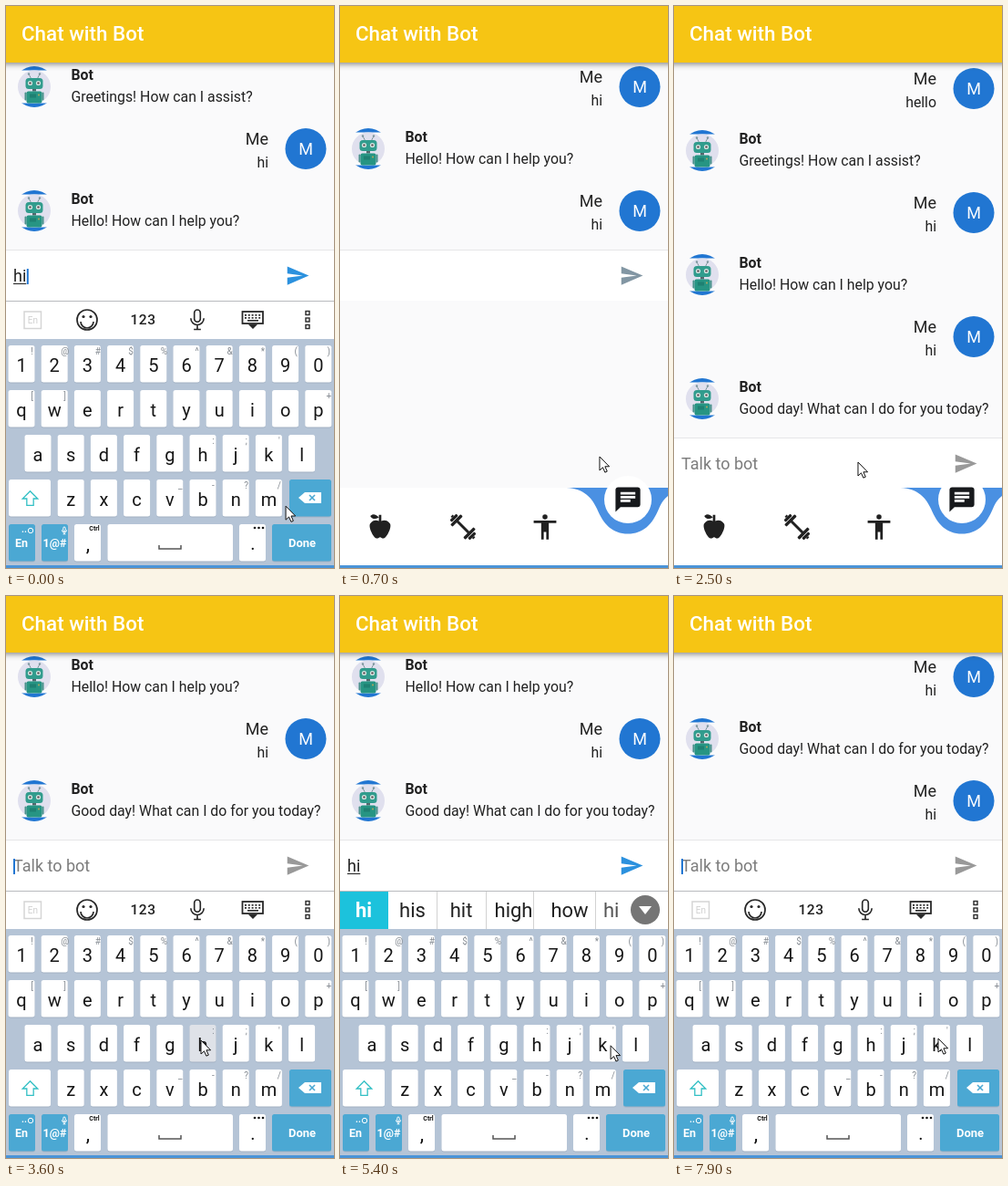
An HTML page with a canvas for the animation above (8 s loop, 360 by 616 pixels).

```html
<!DOCTYPE html>
<html lang="en">
<head>
<meta charset="utf-8">
<title>Chat with Bot</title>
<style>
html, body { margin: 0; width: 100%; height: 100%; overflow: hidden; background: #fafafa; }
canvas { display: block; width: 360px; height: 616px; }
</style>
</head>
<body>
<canvas id="stage"></canvas>
<script>
const W = 360, H = 616, LOOP = 8000;
const canvas = document.getElementById('stage');
const ctx = canvas.getContext('2d');
const ratio = window.devicePixelRatio || 1;
canvas.width = W * ratio;
canvas.height = H * ratio;

const BLUE = '#2176d2', KEY_BLUE = '#4ba8d3', INK = '#212121', BODY_SIZE = 15.83;

// Milestones of the conversation, in ms
const SEND_1 = 400, REPLY = 1400, TYPE_H = 3700, TYPE_I = 4600, SEND_2 = 6900;
const CLOSE = [400, 600], OPEN = [3200, 3400], BAR_DOWN = 800, BAR_UP = 3400;
const CARET_RESETS = [0, 3400, TYPE_H, TYPE_I, 4900, SEND_2];

const MESSAGES = [
  { me: true, text: 'hello', at: 0 },
  { text: 'Greetings! How can I assist?', at: 0 },
  { me: true, text: 'hi', at: 0 },
  { text: 'Hello! How can I help you?', at: 0 },
  { me: true, text: 'hi', at: SEND_1 },
  { text: 'Good day! What can I do for you today?', at: REPLY },
  { me: true, text: 'hi', at: SEND_2 },
];

// time, x, y of the pointer tip
const POINTER = [
  [0, 307, 548], [200, 322, 585], [400, 322, 585], [700, 285, 494], [1000, 272, 488],
  [1400, 272, 488], [2200, 215, 499], [2500, 202, 500], [3000, 190, 502], [3200, 190, 502],
  [3500, 214, 487], [4050, 214, 487], [4400, 271, 442], [4700, 271, 442], [5400, 297, 493],
  [5700, 318, 440], [6000, 316, 324], [6400, 312, 316], [6900, 312, 316], [7600, 288, 480],
  [7900, 290, 485], [8000, 290, 485],
];

const ICONS = {
  send: 'M2 21L23 12 2 3V10l15 2-15 2z',
  chat: 'M20 2H4c-1.1 0-2 .9-2 2v18l4-4h14c1.1 0 2-.9 2-2V4c0-1.1-.9-2-2-2zM6 9h12v2H6zm8 5H6v-2h8zm4-6H6V6h12z',
  person: 'M12 2a2 2 0 0 1 0 4a2 2 0 0 1 0-4zm9 7h-6v13h-2v-6h-2v6H9V9H3V7h18z',
  apple: 'M20 10c2 3-3 12-5 12s-2-1-3-1-1 1-3 1-7-9-5-12 5-3 7-2V5C5.4 8 4.1 3.8 4.1 3.8S6.8.2 11 5V3h2v5c2-1 5-1 7 2z',
  mic: 'M9 5a3 3 0 0 1 6 0v6a3 3 0 0 1-6 0zM5.5 10.5a6.5 6.5 0 0 0 13 0M12 17v4.5M8.5 21.5h7',
  shift: 'M12 3L3 12h5v8h8v-8h5z',
  pointer: 'M0 0V15L3.5 11.8 5.9 17.2 8.3 16.1 5.9 10.8H10.6z',
  bowl: 'M245 528C265 528 275 536 282 551C289 568 299 578.5 316 578.5C333 578.5 343 568 350 551C353 544 356 540 360 537V528z',
};
for (const name in ICONS) ICONS[name] = new Path2D(ICONS[name]);

const clamp = v => Math.max(0, Math.min(1, v));
const progress = (t, [from, to]) => clamp((t - from) / (to - from));

function rect(x, y, w, h, color, radius = 0) {
  ctx.fillStyle = color;
  ctx.beginPath();
  ctx.roundRect(x, y, w, h, radius);
  ctx.fill();
}

function circle(x, y, r, color) {
  ctx.fillStyle = color;
  ctx.beginPath();
  ctx.arc(x, y, r, 0, Math.PI * 2);
  ctx.fill();
}

function line(points, color, width = 1) {
  ctx.strokeStyle = color;
  ctx.lineWidth = width;
  ctx.beginPath();
  points.forEach(([x, y]) => ctx.lineTo(x, y));
  ctx.stroke();
}

function text(str, x, y, size, color = INK, align = 'left', weight = 400) {
  ctx.font = `${weight} ${size}px Roboto, sans-serif`;
  ctx.fillStyle = color;
  ctx.textAlign = align;
  ctx.fillText(str, x, y);
}

// Draws a 24-unit icon centred on x, y
function icon(name, x, y, scale, color, outlineWidth) {
  ctx.save();
  ctx.translate(x - 12 * scale, y - 12 * scale);
  ctx.scale(scale, scale);
  ctx.fillStyle = ctx.strokeStyle = color;
  ctx.lineWidth = outlineWidth;
  if (outlineWidth) ctx.stroke(ICONS[name]);
  else ctx.fill(ICONS[name], 'evenodd');
  ctx.restore();
}

function botAvatar(y) {
  ctx.save();
  ctx.translate(31, y);
  ctx.beginPath();
  ctx.arc(0, 0, 22.5, 0, Math.PI * 2);
  ctx.clip();
  rect(-23, -23, 46, 5, BLUE);
  rect(-23, 18, 46, 5, BLUE);
  circle(0, 0, 18, '#e0e0ee');
  for (const side of [-1, 1]) {
    line([[side * 3.5, -9], [side * 6, -14]], '#7f979e');
    circle(side * 6, -14, 1.2, '#7f979e');
    rect(side * 9.5 - 1, 6, 2, 9, '#4a918b', 1);
  }
  rect(-9.5, -9.5, 19, 12, '#319c8d', 3.5);
  for (const side of [-1, 1]) {
    circle(side * 4.5, -4, 2.6, '#d5e8e4');
    circle(side * 4.5, -4, 1.3, '#6c5b60');
  }
  rect(-2, 2.5, 4, 2.5, '#53676c');
  rect(-8.5, 5, 17, 13, '#279583', 2);
  rect(-5, 8, 7, 4, '#1f8072');
  circle(5, 9, 1, '#b5a55c');
  ctx.restore();
}

function message({ me, text: words }, y) {
  if (me) {
    circle(329, y, 22.5, BLUE);
    text('M', 329, y + 6.3, 18, '#fff', 'center');
    text('Me', 288, y - 5, 18, INK, 'right');
    text(words, 288, y + 20, BODY_SIZE, INK, 'right');
  } else {
    botAvatar(y);
    text('Bot', 71.5, y - 7.5, BODY_SIZE, INK, 'left', 700);
    text(words, 71.5, y + 16, BODY_SIZE);
  }
}

function header() {
  ctx.save();
  ctx.shadowColor = 'rgba(0,0,0,.45)';
  ctx.shadowBlur = 6 * ratio;
  ctx.shadowOffsetY = 2 * ratio;
  rect(-10, -10, W + 20, 72, '#f6c514');
  ctx.restore();
  text('Chat with Bot', 17, 38, 22.4, '#fff', 'left', 500);
}

function inputBar(t, top, draft, focused) {
  rect(0, top, W, 56, '#fff');
  rect(0, top, W, 1, '#e6e6e8');
  const settling = t >= SEND_1 && t < BAR_DOWN;
  if (draft) {
    text(draft, 8, top + 35, 18);
    rect(8, top + 37, ctx.measureText(draft).width, 1, INK);
  } else if (!settling) {
    text('Talk to bot', 8, top + 34.5, 18, '#7c7c7c');
  }
  const reset = CARET_RESETS.filter(r => r <= t).pop();
  if (focused && (t - reset) % 1000 < 500) {
    const x = draft ? 8.5 + ctx.measureText(draft).width : 8;
    rect(x, top + 21, 2, 17, BLUE);
  }
  icon('send', 320, top + 28.5, 1.125, draft ? '#2b91de' : settling ? '#8296a3' : '#999');
}

function navigation() {
  rect(0, 528, W, 88, '#fff');
  ctx.fillStyle = '#4a90e2';
  ctx.fill(ICONS.bowl);
  circle(316, 541, 26, '#fff');
  icon('chat', 316, 541, 1.36, '#17191c');
  icon('apple', 44, 570, 1.35, INK);
  icon('person', 225, 571, 1.38, INK);
  ctx.save();
  ctx.translate(135, 571);
  ctx.rotate(Math.PI / 4);
  rect(-11, -1.5, 22, 3, INK);
  for (const side of [-1, 1]) {
    rect(side * 10 - 1.7, -8, 3.4, 16, INK, 1);
    rect(side * 14 - 1.6, -5, 3.2, 10, INK, 1);
    rect(side * 16.5 - 1, -1.5, 2, 3, INK);
  }
  ctx.restore();
}

function toolbar() {
  ctx.strokeStyle = '#d5d5d5';
  ctx.lineWidth = 1.5;
  ctx.strokeRect(20, 335, 18.5, 18.5);
  text('En', 29.3, 348, 10, '#d0d0d0', 'center');

  ctx.strokeStyle = '#292929';
  ctx.lineWidth = 1.7;
  ctx.beginPath();
  ctx.arc(89, 344, 11, 0, Math.PI * 2);
  ctx.moveTo(96, 346);
  ctx.arc(89, 346, 7, 0, Math.PI);
  ctx.stroke();
  circle(85, 340.5, 1.6, '#292929');
  circle(93, 340.5, 1.6, '#292929');

  ctx.letterSpacing = '0.6px';
  text('123', 150.5, 349, 15.5, INK, 'center', 500);
  ctx.letterSpacing = '0px';
  icon('mic', 210, 344, 1.1, '#292929', 1.5);

  ctx.lineWidth = 1.8;
  ctx.strokeRect(259.5, 335, 22.5, 13);
  for (let i = 0; i < 10; i++) rect(262 + i % 5 * 3.8, 338 + (i > 4) * 3, 2, 1.7, '#292929');
  rect(265, 344, 12, 1.6, '#292929');
  triangle(271, 349, 5, 5, '#292929');

  ctx.lineWidth = 1.4;
  for (let i = 0; i < 3; i++) ctx.strokeRect(329, 334.5 + i * 7.5, 4, 4);
}

function triangle(x, y, half, height, color) {
  ctx.fillStyle = color;
  ctx.beginPath();
  ctx.moveTo(x - half, y);
  ctx.lineTo(x + half, y);
  ctx.lineTo(x, y + height);
  ctx.fill();
}

function suggestions(draft) {
  rect(0, 324, 53, 41, '#1cc2dc');
  text(draft, 26, 352, 22, '#fff', 'center', 700);
  const words = [['his', 79.5], ['hit', 133], ['high', 190.5], ['how', 252]];
  words.forEach(([word, x]) => text(word, x, 352, 22, INK, 'center'));
  ctx.save();
  ctx.beginPath();
  ctx.rect(282, 324, 24, 41);
  ctx.clip();
  text('hi', 289, 352, 22, '#555');
  ctx.restore();
  for (const x of [106, 160, 212, 280]) rect(x, 324, 1, 41, '#d2d2d2');
  circle(335, 344, 16, '#757575');
  triangle(335, 340, 7, 9, '#fff');
}

function key(x, y, width, color = '#fff') {
  rect(x, y + 1, width, 40.5, '#a3b2c4', 2.5);
  rect(x, y, width, 40.5, color, 2.5);
}

function keyRow(letters, hints, firstX, y, pressed) {
  [...letters].forEach((letter, i) => {
    const x = firstX + i * 36.2;
    key(x - 14.5, y, 29, letter === pressed ? '#dfe2e8' : '#fff');
    text(letter, x, y + 28.5, 20, '#161616', 'center');
    text(hints[i] || '', x + 11.5, y + 10, 10, '#858b92', 'center');
  });
}

function keyboard(t, draft) {
  rect(0, 323, W, 293, '#b5c4d6');
  rect(0, 323, W, 42, '#fff');
  rect(0, 323, W, 1, '#b9bbbe');
  if (t >= TYPE_H && t < SEND_2) suggestions(draft);
  else toolbar();

  const pressed = t >= 3550 && t < 3750 ? 'h' : t >= 4500 && t < 4650 ? 'i' : '';
  keyRow('1234567890', '!@#$%^&*()', 17, 372, pressed);
  keyRow('qwertyuiop', '[]       +', 17, 421, pressed);
  keyRow('asdfghjkl', "     :;'", 35, 470, pressed);
  keyRow('zxcvbnm', '   _-?/', 71.2, 519, pressed);

  key(3, 519, 46);
  icon('shift', 26.5, 540, 0.92, '#31bfc4', 1.4);
  key(311, 519, 46, KEY_BLUE);
  ctx.fillStyle = '#fff';
  ctx.beginPath();
  [[321, 539], [328, 533], [346, 533], [346, 545], [328, 545]].forEach(p => ctx.lineTo(...p));
  ctx.fill();
  line([[333, 536], [339, 542]], KEY_BLUE, 1.6);
  line([[339, 536], [333, 542]], KEY_BLUE, 1.6);

  const y = 568;
  key(3, y, 29, KEY_BLUE);
  text('En', 17, 593, 12.5, '#fff', 'center', 700);
  text('..', 20, 577, 10, '#fff', 'center', 700);
  ctx.strokeStyle = '#fff';
  ctx.lineWidth = 1;
  ctx.beginPath();
  ctx.arc(27, 575, 2.7, 0, Math.PI * 2);
  ctx.stroke();
  key(39, y, 29, KEY_BLUE);
  text('1@#', 53.5, 593, 12.5, '#fff', 'center', 700);
  icon('mic', 64, 575, 0.4, '#fff', 2.5);
  key(75, y, 29);
  text(',', 90, 597, 22, '#111', 'center');
  text('Ctrl', 97, 575, 7, '#111', 'center', 700);
  key(111.5, y, 137.5);
  line([[168, 591], [168, 595], [192, 595], [192, 591]], '#555', 1.5);
  key(256, y, 29);
  text('.', 271, 596, 20, '#111', 'center');
  for (let i = 0; i < 3; i++) circle(273 + i * 4.5, 572, 1.3, '#111');
  key(292, y, 65, KEY_BLUE);
  text('Done', 325, 593, 13, '#fff', 'center', 700);
}

function pointer(t) {
  const i = POINTER.findIndex(p => p[0] > t);
  const [t0, x0, y0] = POINTER[i - 1], [t1, x1, y1] = POINTER[i];
  const k = progress(t, [t0, t1]);
  ctx.save();
  ctx.translate(x0 + (x1 - x0) * k, y0 + (y1 - y0) * k);
  ctx.fillStyle = '#fff';
  ctx.fill(ICONS.pointer);
  ctx.strokeStyle = '#111';
  ctx.lineWidth = 1;
  ctx.stroke(ICONS.pointer);
  ctx.restore();
}

function draftAt(t) {
  if (t < SEND_1) return 'hi';
  if (t < TYPE_H || t >= SEND_2) return '';
  return t < TYPE_I ? 'h' : 'hi';
}

function draw(t) {
  ctx.setTransform(ratio, 0, 0, ratio, 0, 0);
  rect(0, 0, W, H, '#fafafb');
  const raised = t < BAR_DOWN || t >= BAR_UP;
  const barTop = raised ? 267 : 473;
  const draft = draftAt(t);

  MESSAGES.filter(m => m.at <= t).reverse()
    .forEach((m, i) => message(m, barTop - 42.5 - i * 68));
  header();
  inputBar(t, barTop, draft, t < SEND_1 || t >= BAR_UP);
  navigation();

  const shown = t < OPEN[0] ? 1 - progress(t, CLOSE) : progress(t, OPEN);
  if (shown) {
    ctx.save();
    ctx.translate(0, 293 * (1 - shown));
    keyboard(t, draft);
    ctx.restore();
  }
  rect(0, 613, W, 3, '#4a94d8');
  pointer(t);
}

const start = performance.now();
function tick() {
  draw((performance.now() - start) % LOOP);
  requestAnimationFrame(tick);
}
tick();
</script>
</body>
</html>
```
